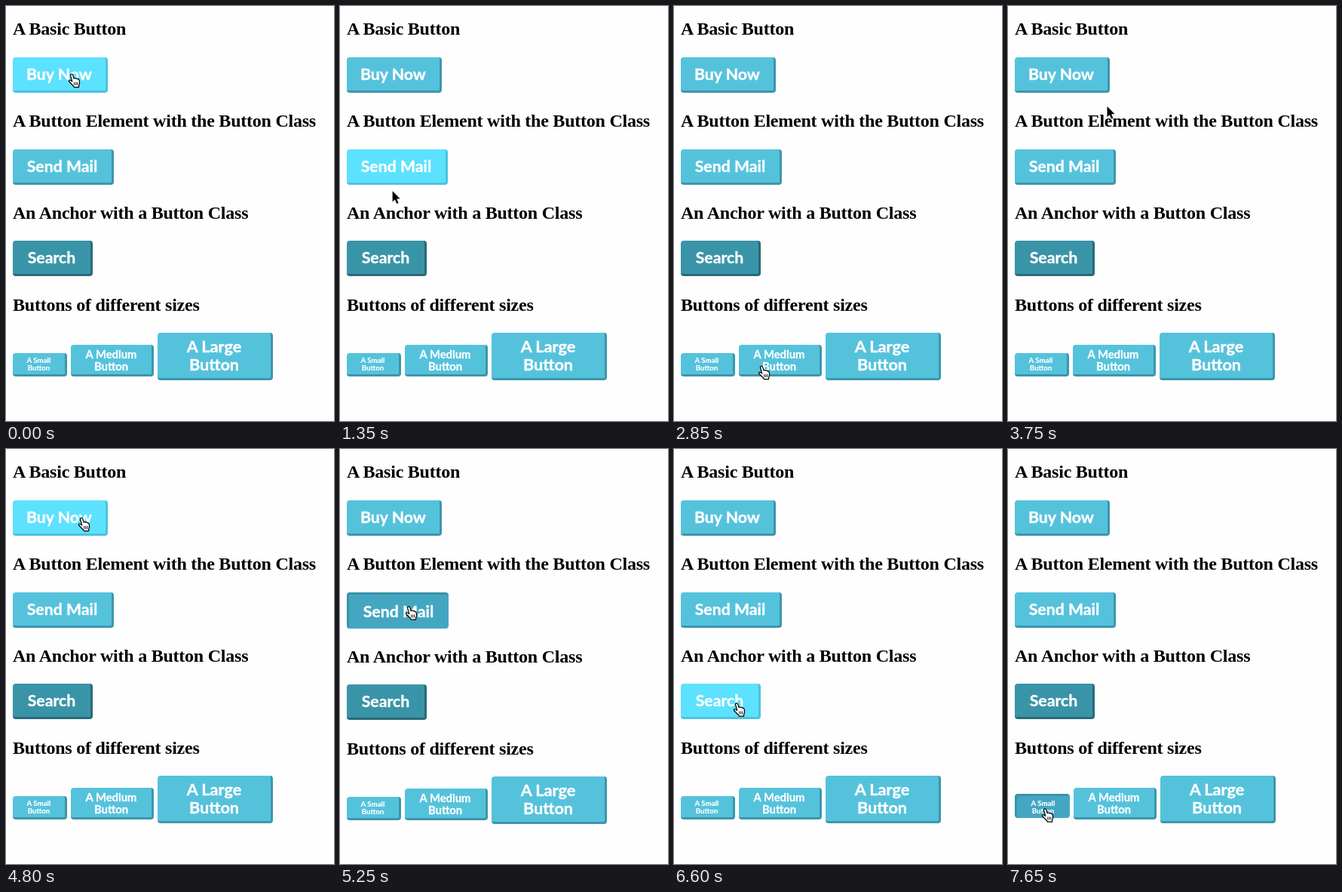
Recreate the animation shown at these times as an HTML page. Size 435 px wide and 550 px high, loop 8000 ms.

```html
<!DOCTYPE html>
<html lang="en">
<head>
<meta charset="utf-8">
<title>Buttons</title>
<style>
  html, body { margin: 0; width: 100%; height: 100%; overflow: hidden; background: #fefefe; }
  main { position: absolute; left: 9px; top: 16.45px; white-space: nowrap; }
  h2 { margin: 0 0 23.6px; font: bold 24px/28px "Liberation Serif", serif; letter-spacing: -.23px; color: #000; }
  .row { display: flex; align-items: flex-end; gap: 5px; margin-bottom: 23.1px; }
  .btn {
    width: var(--w); padding: var(--pad, 10px) 0; border: 0 solid #3d96ab; border-width: 0 3px 3px 0;
    border-radius: 4px; background: #55c2dc; color: #fff; -webkit-text-stroke: .017em #fff;
    font: 700 21.3px/24px Lato, sans-serif; text-align: center;
  }
  .small { --w: 69px; --pad: 4px; font-size: 9.7px; line-height: 10px; }
  .medium { --w: 107px; --pad: 3.5px; font-size: 14.8px; line-height: 16px; }
  .large { --w: 150px; --pad: 6px; font-size: 21.7px; }
  .small, .medium { margin-bottom: 5px; }
  .visited { background: #3a94a8; border-color: #296a79; }
  .hover { background: #5ce1ff; border-color: #4dc3de; }
  .active {
    background: #44a7c2; border-color: #3a93a8; border-width: 3px 0 0 3px;
    padding-right: 1px; padding-bottom: calc(var(--pad, 10px) + 1px);
  }
  .small.active { margin-bottom: 7px; }
  svg { position: absolute; left: 0; top: 0; overflow: visible; }
</style>
</head>
<body>
<main>
  <h2>A Basic Button</h2>
  <div class="row"><div class="btn" style="--w: 123px">Buy Now</div></div>
  <h2>A Button Element with the Button Class</h2>
  <div class="row"><div class="btn" style="--w: 131px">Send Mail</div></div>
  <h2>An Anchor with a Button Class</h2>
  <div class="row"><div class="btn visited" style="--w: 103px">Search</div></div>
  <h2>Buttons of different sizes</h2>
  <div class="row">
    <div class="btn small">A Small<br>Button</div>
    <div class="btn medium">A Medium<br>Button</div>
    <div class="btn large">A Large<br>Button</div>
  </div>
</main>
<svg width="1" height="1">
  <g id="cursor">
    <path id="arrow" d="M0 0V14.2L3.2 11.2 5.6 16.6 7.9 15.6 5.6 10.3H10Z" stroke="#fff" paint-order="stroke" stroke-width="2"/>
    <g id="hand" fill="#fff" stroke="#000" stroke-width="1.2" stroke-linejoin="round">
      <path d="M-1.5 1C-1.8-.8 1-1.2 1.7.6L3.2 5.2C3.8 4.2 5.4 4.3 5.8 5.5 6.5 4.6 7.9 4.9 8.2 6.2 9 5.6 10.1 6.4 10.3 8 11 10.3 10.8 12 9.8 14L9.5 16.6H3.4C2.5 14.4.2 13-1.5 11-3.2 9.4-4.2 8.2-3.2 7.4-2.1 6.8-.8 7.7.7 9Z"/>
      <path d="M3.7 10v4M5.8 10v4M7.9 10v4" stroke-width=".9"/>
    </g>
  </g>
</svg>
<script>
const LOOP = 8000, STEP = 150;
// The pointer rests at each stop, then glides to the next.
const stops = [
  [0, 600, 87, 91], [900, 1200, 73, 209], [1650, 1800, 60, 349],
  [2550, 2550, 93, 518], [2850, 2850, 116, 478], [3300, 3300, 245, 470], [3750, 3750, 131.5, 133],
  [4200, 4800, 100, 92, true], [5250, 6000, 91, 209.5, true],
  [6600, 6600, 83, 337.5], [6750, 7200, 83, 337.5, true], [7650, LOOP, 49, 477.5, true],
].map(([from, to, x, y, press]) => ({ from, to, x, y, press }));

const cursor = document.getElementById("cursor");
const arrow = document.getElementById("arrow");
const hand = document.getElementById("hand");
const buttons = [...document.querySelectorAll(".btn")].map(el => ({ el, box: el.getBoundingClientRect() }));

const ease = u => u * u * (3 - 2 * u);

function pointer(t) {
  const i = stops.findLastIndex(s => s.from <= t);
  const a = stops[i], b = stops[i + 1] ?? a;
  const k = t <= a.to ? 0 : ease((t - a.to) / (b.from - a.to));
  const x = a.x + (b.x - a.x) * k, y = a.y + (b.y - a.y) * k;
  const over = buttons.find(({ box }) => x >= box.left && x < box.right && y >= box.top && y < box.bottom);
  return { x, y, over, down: a.press && t < a.to };
}

function draw(now) {
  const t = Math.floor(now % LOOP / STEP) * STEP;
  const { x, y, over, down } = pointer(t);
  const lit = pointer(Math.max(t - STEP, 0)).over; // the highlight trails by one step

  for (const b of buttons) {
    const pressed = down && b === over;
    b.el.classList.toggle("active", !!pressed);
    b.el.classList.toggle("hover", b === lit && !pressed);
  }
  cursor.setAttribute("transform", `translate(${x} ${y})`);
  hand.style.display = over ? "" : "none";
  arrow.style.display = over ? "none" : "";
  requestAnimationFrame(() => draw(performance.now()));
}
draw(0);
</script>
</body>
</html>
```
